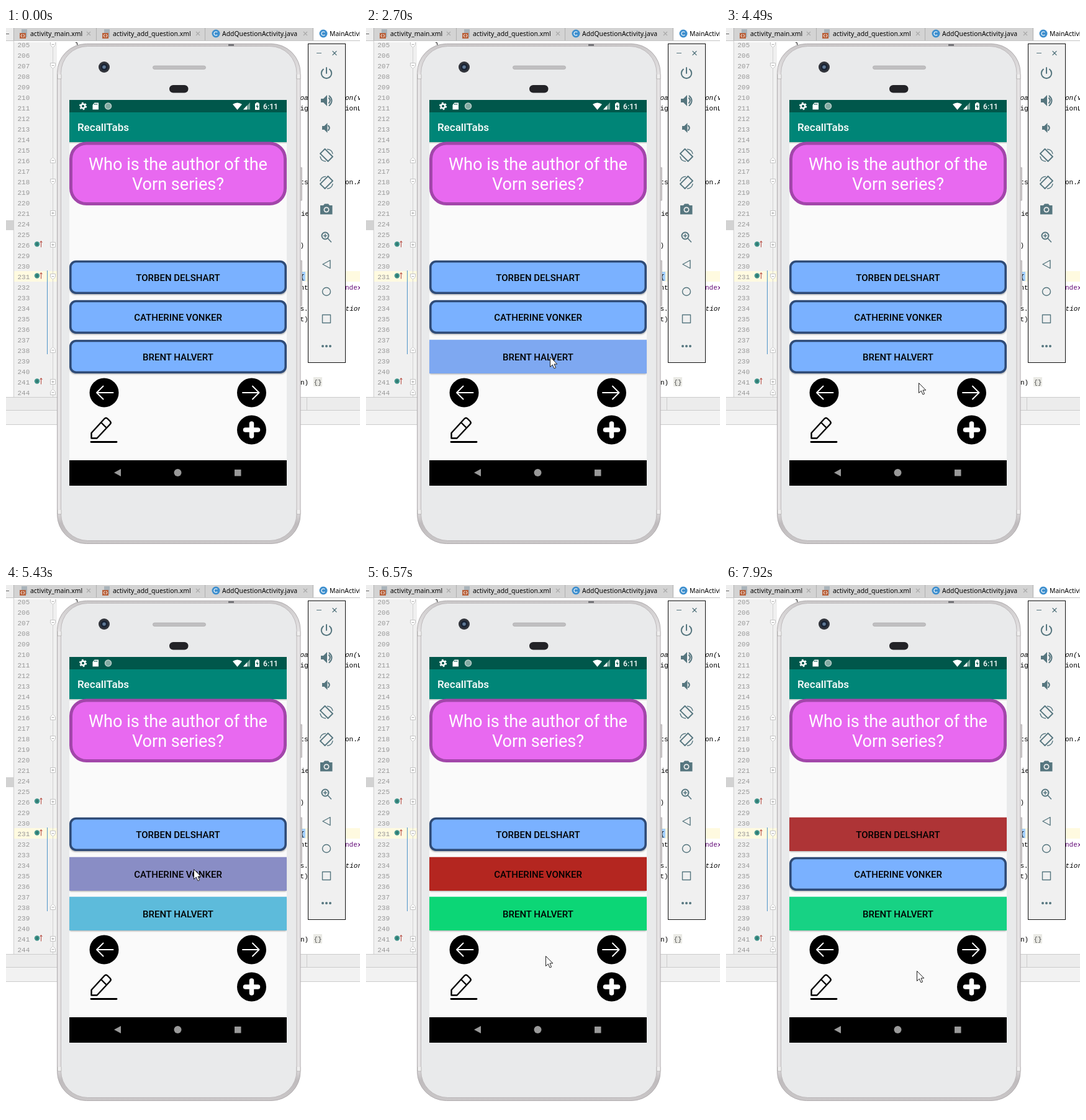
An HTML page for the animation above (7.99 s loop, 570 px wide and 853 px high).

```html
<!DOCTYPE html>
<html lang="en">
<head>
<meta charset="utf-8">
<title>Quiz app in an emulator</title>
<style>
  html, body { margin: 0; width: 100%; height: 100%; overflow: hidden; background: #fff; }
  svg { display: block; width: 570px; height: 853px; }
  text { white-space: pre; }
  .ui { font-family: Roboto, sans-serif; }
  .tab { font: 10.4px "Noto Sans", sans-serif; }
  .mono { font-family: "Liberation Mono", monospace; }
  .mid { text-anchor: middle; }
  .line { fill: none; stroke-linecap: round; stroke-linejoin: round; }
</style>
</head>
<body>
<svg id="stage" viewBox="0 0 570 853">
  <defs>
    <linearGradient id="metal" x2="0" y2="1">
      <stop offset="0" stop-color="#cbc8c9"/><stop offset=".065" stop-color="#e6e4e5"/>
      <stop offset=".93" stop-color="#e6e4e5"/><stop offset=".96" stop-color="#bfbbbd"/>
      <stop offset="1" stop-color="#cbc8c9"/>
    </linearGradient>
    <filter id="soft" x="-5%" y="-20%" width="110%" height="150%"><feGaussianBlur stdDeviation="1.3"/></filter>
    <clipPath id="codeArea"><path d="M13 23H570V595H13Z"/></clipPath>
  </defs>

  <rect width="570" height="853" fill="#fff"/>
  <g id="editor" clip-path="url(#codeArea)"></g>
  <path d="M12.5 20V595" stroke="#cfcfcf"/>
  <rect y="310" width="12" height="16" fill="#d2d2d2"/>
  <rect y="595" width="570" height="21" fill="#ececec"/>
  <rect y="617" width="570" height="22" fill="#f2f2f2"/>
  <path d="M0 595.5H570M0 616.5H570M0 639.5H570M484.5 596V616" stroke="#cccccc"/>
  <g id="tabs"></g>

  <g id="phone">
    <path d="M473 225h3.5v53H473zM473 375h3.5v73H473z" fill="#cfcccd" stroke="#a9a5a7" stroke-width=".7"/>
    <rect x="82.5" y="25.5" width="391.5" height="806" rx="47" fill="url(#metal)" stroke="#b0acae"/>
    <rect x="88.5" y="29.5" width="379.5" height="797" rx="43" fill="#e9eaeb" stroke="#bdb9bb"/>
    <path d="M83 75v7h6v-7M468 75v7h6v-7M83 777v7h6v-7M468 777v7h6v-7" fill="#efeeee" stroke="#aaa6a8" stroke-width=".7"/>
    <rect x="358" y="26" width="9" height="3" fill="#77777b"/>
    <circle cx="158" cy="63" r="9" fill="#31343b"/>
    <circle cx="158" cy="63" r="5.5" fill="#182335"/>
    <circle cx="158" cy="63" r="2.8" fill="#5e7895"/>
    <rect x="236.5" y="61" width="85" height="5.5" rx="2.7" fill="#c0bfc1" stroke="#aaa8aa" stroke-width=".7"/>
    <rect x="263" y="92" width="30.5" height="12.5" rx="6.2" fill="#232327"/>
  </g>

  <rect x="102" y="116" width="350" height="622" fill="#fafafa"/>
  <rect x="102" y="184" width="350" height="2" fill="#d5d5d5"/>
  <rect x="102" y="116" width="350" height="20" fill="#00574b"/>
  <rect x="102" y="136" width="350" height="48" fill="#008577"/>
  <g fill="#fff">
    <circle cx="124" cy="126" r="3.3" fill="none" stroke="#fff" stroke-width="2.5"/>
    <circle cx="124" cy="126" r="5.3" fill="none" stroke="#fff" stroke-width="1.7" stroke-dasharray="2.78"/>
    <path d="M139.5 124l3-3.5h6.500v11h-9.500z"/>
    <path d="M142.500 122v2M144.500 122v2M146.500 122v2" stroke="#00574b"/>
    <circle cx="164.500" cy="126" r="5" fill="#82aaa3" stroke="#b8cdc9" stroke-width="1.5"/>
    <path d="M365 123q7.500-5 15 0l-7.500 9z"/>
    <path d="M393 120v11.500h-11z" fill="#74a198"/>
    <path d="M388 125v6.500h-6z"/>
    <path d="M401 121.500h2V120h3.500v1.500h1.500v10.500h-7z"/>
    <path d="M405 123l-2.500 4h2l-.5 3.500 2.800-4.500h-2z" fill="#00574b"/>
    <text class="ui" x="414" y="130.500" font-size="12.2" font-weight="500">6:11</text>
    <text class="ui" x="115" y="166" font-size="17" font-weight="500">RecallTabs</text>
  </g>

  <rect x="104.5" y="186" width="345" height="97.500" rx="25" fill="#e869f0" stroke="#a246aa" stroke-width="5"/>
  <g class="ui mid" fill="#fff" font-size="27.1">
    <text x="277" y="229">Who is the author of the</text>
    <text x="277" y="261">Vorn series?</text>
  </g>
  <g id="answers"></g>

  <circle cx="158" cy="588" r="23.500"/><circle cx="395.500" cy="588" r="23.500"/>
  <circle cx="395.500" cy="648" r="23.500"/>
  <path class="line" d="M172.500 588H146M156.500 577.500l-10.500 10.500 10.500 10.500M381 588h26.500M397 577.500l10.500 10.500-10.500 10.500" stroke="#fff" stroke-width="1.900"/>
  <path class="line" d="M395.500 638v20M385.500 648h20" stroke="#fff" stroke-width="7.500"/>
  <path class="line" d="M137.500 661.500v-8.500L158.500 630q2.500-2.500 5 0l4 4q2.500 2.500 0 5L146.500 661.500zM153 636l9 9" stroke="#000" stroke-width="2.400"/>
  <path d="M137 667.500H178" stroke="#000" stroke-width="2.800" stroke-linecap="round"/>

  <rect x="102" y="697" width="350" height="41"/>
  <path d="M174 717l11-6v12zM368 712h10.500v10.500H368z" fill="#999"/>
  <circle cx="276.500" cy="717" r="6" fill="#999"/>

  <rect x="486.500" y="25.500" width="60" height="514" fill="#f0f0f0" stroke="#111"/>
  <g class="line" stroke="#56767f" stroke-width="2">
    <path d="M500.500 40.500h7M526 37.500l6 6M532 37.500l-6 6" stroke-width="1.200"/>
    <path d="M511 66.500a8.200 8.200 0 1 0 10 0M516 64v9"/>
    <path d="M520 113q3.500 4 0 8M520.500 109.500q8 7.500 0 15.500"/>
    <path d="M519 157.500q3.500 3.500 0 7.500"/>
    <g id="rotate">
      <path d="M506 202.500l7.500-7.500 12.500 12.500-7.500 7.500z" stroke-width="1.900"/>
      <path d="M517.500 195.500q7 .5 8.500 7M506 207.500q1.500 7 8.500 7.500" stroke-width="1.300"/>
    </g>
    <use href="#rotate" transform="matrix(-1 0 0 1 1032 44)"/>
    <circle cx="514" cy="335" r="5.500"/>
    <path d="M518.500 339.500l5 5.500M511.500 335h5M514 332.500v5" stroke-width="1.600"/>
    <path d="M510 381l12-6.500v13zM509.500 462.500h13v13h-13z" stroke-width="1.400"/>
    <circle cx="516" cy="425" r="6.500" stroke-width="1.400"/>
  </g>
  <g fill="#56767f">
    <path d="M507 114h4l6-6v18l-6-6h-4zM509 158h3.500l5-5v16l-5-5H509z"/>
    <path d="M507 286h4l2-2.500h6l2 2.500h4.500v14.500H506V286z"/>
    <circle cx="516" cy="293" r="4.500" fill="#f0f0f0"/><circle cx="516" cy="293" r="2.800"/>
    <circle cx="510" cy="513" r="2"/><circle cx="516" cy="513" r="2"/><circle cx="522" cy="513" r="2"/>
  </g>

  <g id="pointer">
    <circle id="press" r="12.500" fill="#d9dc28" fill-opacity=".68"/>
    <path d="M.5.5V16.500L4.300 13 7 19l2.600-1.100L7 12h4.800z" fill="#fff" stroke="#222" stroke-width="1"/>
  </g>
</svg>

<script>
const LOOP = 7990;
const $ = id => document.getElementById(id);

function buildEditor() {
  const folds = { 205: "down", 207: "down", 216: "up", 218: "down", 221: "plus", 226: "plus",
                  231: "down", 238: "up", 241: "plus", 244: "up" };
  const shapes = { down: "v5l4 4 4-4v-5z", up: "v-5l4-4 4 4v5z", plus: "v8h8v-8z" };
  const starts = { down: -4, up: 4, plus: -4 };
  let out = `<rect x="13" y="20" width="69" height="576" fill="#f0f0f0"/>
    <rect x="13" y="392" width="557" height="17" fill="#fffae0"/>
    <path d="M75.500 20V595" stroke="#d2d2d2"/><path d="M66.500 391V526" stroke="#4f94c8"/>
    <g class="mono" font-size="11">`;
  let y = 26.5;
  for (let n = 205; n <= 244; n++) {
    if ([222, 223, 227, 228, 242, 243].includes(n)) continue;
    out += `<text x="18.500" y="${y + 4}" fill="#999">${n}</text>`;
    const kind = folds[n];
    if (kind) {
      out += `<path d="M71.500 ${y + starts[kind]}${shapes[kind]}" fill="#fff" stroke="#c4c4c4"/>
        <path d="M73.500 ${y}h4${kind === "plus" ? "m-2-2v4" : ""}" stroke="#aaa"/>`;
    }
    if ([226, 231, 241].includes(n)) {
      out += `<circle cx="50" cy="${y - 1}" r="4.200" fill="#3f938a"/>
        <path d="M50 ${y - 3}v4" stroke="#17423e"/>
        <path d="M56.500 ${y + 4}v-10m-2 2.500l2-2.500 2 2.500" fill="none" stroke="#b5493f"/>`;
    }
    y += 17;
  }
  const code = (x, y, s, extra = "") => `<text x="${x}" y="${y + 3.5}" ${extra}>${s}</text>`;
  const italic = 'font-style="italic"';
  out += `<rect x="472" y="393" width="10" height="15" fill="#a6d2ff"/>
    <rect x="495" y="563" width="14" height="15" fill="#e9e9e4"/>` +
    code(111, 27, "}") + code(473.5, 112, "oa", italic) + code(546, 112, "on(v", italic) +
    code(473.5, 129, "ig") + code(546, 129, "ionL") + code(473.5, 248, "ts") + code(546, 248, "on.A") +
    code(475, 299, "ie") + code(473.5, 350, ")") + code(474, 401, "{") +
    code(473.5, 418, "nt") + code(546, 418, "ndex", 'fill="#660e7a"') +
    code(473.5, 452, "s.") + code(540, 452, "ation", italic) + code(473.5, 469, "t)") +
    code(474, 571, "n)") + code(495.5, 571, "{}", 'fill="#555"') + "</g>";
  $("editor").innerHTML = out;
}

function buildTabs() {
  const xmlIcon = x => `<path d="M${x + 3} 2h9v13h-9z" fill="#a9b3ba"/>
    <rect x="${x}" y="8" width="10" height="9" fill="#b9623c"/>
    <path d="M${x + 4} 10l-2 2.500 2 2.500m2-5l2 2.500-2 2.500" fill="none" stroke="#fff"/>`;
  const classIcon = x => `<circle cx="${x}" cy="9" r="6.500" fill="#3e8fce"/>
    <path d="M${x + 2.2} 7a3 3 0 1 0 0 4" fill="none" stroke="#fff" stroke-width="1.200"/>`;
  const label = (x, s) => `<text class="tab" x="${x}" y="13">${s}</text>`;
  const close = x => `<path d="M${x - 3} 6l6 6m0-6l-6 6" stroke="#aaa" stroke-width="1.200"/>`;
  $("tabs").innerHTML = `<rect width="570" height="20" fill="#d3d3d3"/>
    <rect x="0" width="12" height="20" fill="#ededed"/><path d="M0 9.500h5" stroke="#666"/>
    <rect x="494" width="76" height="20" fill="#fff"/>
    <path d="M12.500 0V20M145.500 0V20M320.500 0V20M494.500 0V20" stroke="#b0b0b0"/>
    <path d="M0 20.500H570" stroke="#c4c4c4"/><path d="M13 22H570" stroke="#fff" stroke-width="2"/>` +
    xmlIcon(22) + label(39, "activity_main.xml") + close(133) +
    xmlIcon(155) + label(172, "activity_add_question.xml") + close(309) +
    classIcon(338) + label(348, "AddQuestionActivity.java") + close(482) +
    classIcon(511) + label(521, "MainActivity.java");
}

function buildAnswers() {
  $("answers").innerHTML = ["TORBEN DELSHART", "CATHERINE VONKER", "BRENT HALVERT"].map((name, i) => `
    <g transform="translate(102 ${374.7 + i * 64})">
      <rect class="shade" x="1" y="3" width="348" height="52.500" rx="8" fill="#000" opacity=".3" filter="url(#soft)"/>
      <rect class="face"/>
      <text class="ui mid" x="175" y="33" font-size="15" font-weight="500">${name}</text>
    </g>`).join("");
}

const BLUE = [122, 177, 255], RED = [180, 38, 32], GREEN = [12, 214, 118];

// Each tap tints rows until the next tap on empty space clears them.
const taps = [
  { at: 2460, clear: 4170, step: 78.5, row: 2, tint: { 2: RED } },
  { at: 5110, clear: 6820, step: 78.5, row: 1, tint: { 1: RED, 2: GREEN } },
  { at: 7350, clear: LOOP, step: 81.4, row: 0, tint: { 0: RED, 2: GREEN } }
];
const presses = [2460, 4100, 5110, 6740, 7350];

// start, end, steps, control point, destination
const moves = [
  [230, 460, 4, 425, 742, 325, 632],
  [1310, 1850, 8, 312, 580, 296, 530],
  [3470, 3700, 4, 220, 580, 307, 613],
  [4490, 4720, 4, 310, 531, 337, 448],
  [4950, 5030, 2, 320, 453, 302, 458],
  [5740, 5960, 4, 224, 503, 311, 601],
  [6420, 6570, 3, 300, 601, 289, 598],
  [6890, 7200, 5, 298, 500, 314, 410],
  [7840, 7920, 2, 300, 334, 307, 622]
];

function pointerAt(t) {
  let x = 525, y = 852;
  for (const [start, end, count, cx, cy, tx, ty] of moves) {
    if (t < start) break;
    const done = Math.floor((t - start) / (end - start) * (count - 1) + 0.02) + 1;
    const u = Math.min(1, done / count), v = 1 - u;
    x = v * v * x + 2 * u * v * cx + u * u * tx;
    y = v * v * y + 2 * u * v * cy + u * u * ty;
  }
  return [x, y];
}

function setAttrs(el, attrs) {
  for (const key in attrs) el.setAttribute(key, attrs[key]);
}

function drawAnswer(group, row, t) {
  const tap = taps.find(p => t >= p.at && t < p.clear);
  const elapsed = tap ? Math.floor((t - tap.at) / tap.step) * tap.step : 0;
  const tint = tap && tap.tint[row];
  const flat = tint && elapsed > 150;
  const mix = tint ? Math.min(1, Math.max(0, (elapsed - 210) / 400)) : 0;
  const color = BLUE.map((c, i) => Math.round(c + (tint ? (tint[i] - c) * mix : 0)));
  const inset = flat ? 0 : 1.8;
  setAttrs(group.querySelector(".face"), {
    x: inset, y: inset, width: 350 - 2 * inset, height: 54.3 - 2 * inset, rx: flat ? 0 : 9,
    fill: `rgb(${color})`, stroke: flat ? "none" : "#2f4b77", "stroke-width": 3.6
  });
  const lifted = tap && tap.row === row && elapsed > 70 && elapsed < 230;
  setAttrs(group.querySelector(".shade"), { y: lifted ? 5 : 3, rx: flat ? 0 : 8 });
}

function render(t) {
  [...$("answers").children].forEach((group, row) => drawAnswer(group, row, t));
  const [x, y] = pointerAt(t);
  $("pointer").setAttribute("transform", `translate(${Math.round(x)} ${Math.round(y)})`);
  $("pointer").style.display = t < moves[0][0] ? "none" : "";
  $("press").style.display = presses.some(p => t >= p && t < p + 75) ? "" : "none";
}

buildEditor();
buildTabs();
buildAnswers();
render(0);

const began = performance.now();
function tick() {
  render((performance.now() - began) % LOOP);
  requestAnimationFrame(tick);
}
requestAnimationFrame(tick);
</script>
</body>
</html>
```
